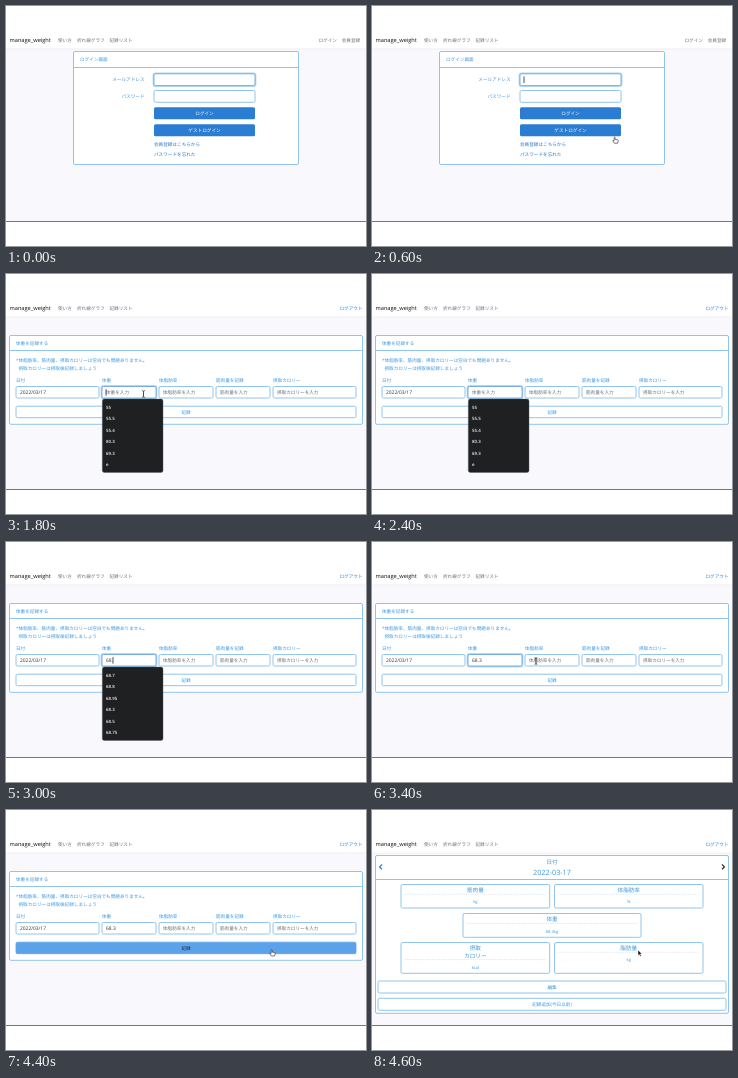
Write an HTML page that moves like this. It is 360 by 240 pixels and loops after 4800 ms.

```html
<!DOCTYPE html>
<html lang="ja">
<head>
<meta charset="utf-8">
<style>
html, body { margin: 0; width: 100%; height: 100%; overflow: hidden; background: #fff; }
svg { display: block; width: 100vw; height: 100vh; font-family: "Open Sans", "Noto Sans CJK JP", sans-serif; text-rendering: geometricPrecision; }
</style>
</head>
<body>
<svg id="stage" viewBox="0 0 360 240"></svg>
<script>
const LOOP = 4800, STEP = 200;
const BLUE = '#3c97dc', EDGE = '#74b8e9', BUTTON = '#2b7dd4', GRAY = '#6c6f73', INK = '#333';
const stage = document.getElementById('stage');

// y is the vertical centre of the text
function text(x, y, str, { fill = BLUE, size = 4.62, anchor = 'start', weight = 400 } = {}) {
  return `<text x="${x}" y="${y + size * 0.37}" fill="${fill}" font-size="${size}" text-anchor="${anchor}" font-weight="${weight}">${str}</text>`;
}
const centred = (x, y, str, style) => text(x, y, str, { anchor: 'middle', ...style });

function box(x1, y1, x2, y2, { fill = '#fff', stroke = EDGE, width = 0.8, r = 1.5 } = {}) {
  return `<rect x="${x1}" y="${y1}" width="${x2 - x1}" height="${y2 - y1}" rx="${r}" fill="${fill}" stroke="${stroke}" stroke-width="${width}"/>`;
}
const line = (x1, y1, x2, y2, stroke = EDGE, extra = '') =>
  `<path d="M${x1} ${y1}L${x2} ${y2}" stroke="${stroke}" stroke-width=".8" fill="none" ${extra}/>`;
const ring = (x1, y1, x2, y2) =>
  box(x1 - 0.6, y1 - 0.6, x2 + 0.6, y2 + 0.6, { fill: 'none', stroke: '#b3d7f5', width: 1.6, r: 2 });
const field = (x1, y1, x2, y2, focused) =>
  (focused ? ring(x1, y1, x2, y2) : '') + box(x1, y1, x2, y2, focused ? { stroke: '#5b9fd6' } : {});
const caret = (x, y) => line(x, y - 3.3, x, y + 3.3, '#222');

function cursor(kind, x, y) {
  const shapes = {
    arrow: '<path d="M0 0V5.6L1.3 4.4 2.3 6.6 3.3 6.1 2.3 4H4Z" fill="#111" stroke="#fff" stroke-width=".5"/>',
    beam: '<path d="M-1.3-3.3Q0-3.3 0-2.5Q0-3.3 1.3-3.3M0-2.5V2.5M-1.3 3.3Q0 3.3 0 2.5Q0 3.3 1.3 3.3" fill="none" stroke="#222" stroke-width=".8"/>',
    hand: '<path d="M-.9.4Q-.4-.5.1.4V2.3L2.8 2.8Q3.4 3 3.2 4L2.6 6.2H-.6L-2.2 3.8Q-2 3-1.2 3.5L-.9 3.8Z" fill="#fff" stroke="#222" stroke-width=".6"/>'
  };
  return `<g transform="translate(${x} ${y})">${shapes[kind]}</g>`;
}

function shell(loggedIn) {
  const link = { fill: GRAY };
  return '<rect width="360" height="240" fill="#fff"/><rect y="43" width="360" height="172" fill="#f8f8fd"/>' +
    line(0, 43, 360, 43, '#ebebf1') + line(0, 215.5, 360, 215.5, '#555') +
    text(3.5, 34, 'manage_weight', { fill: '#111', size: 5.65 }) +
    text(52, 34, '使い方', link) + text(71, 34, '折れ線グラフ', link) + text(103.5, 34, '記録リスト', link) +
    (loggedIn ? text(333.5, 34, 'ログアウト', { fill: '#2587de' })
              : text(312.5, 34, 'ログイン', link) + text(335.7, 34, '会員登録', link));
}

function loginPage(t) {
  const pressed = t >= 800;
  const white = { fill: '#fff' };
  const button = (y, label, active) =>
    (active ? ring(148, y, 249, y + 12) : '') +
    box(148, y, 249, y + 12, { fill: active ? '#2268b3' : BUTTON, stroke: 'none' }) + centred(198.5, y + 6, label, white);
  const dark = { fill: '#2878c4' };
  return shell(false) + box(67.5, 45.5, 292.5, 158.5) + line(67.5, 61.5, 292.5, 61.5) +
    text(74, 53.3, 'ログイン画面') +
    text(138.5, 73.3, 'メールアドレス', { anchor: 'end' }) + text(138.5, 90.2, 'パスワード', { anchor: 'end' }) +
    field(148, 67.8, 249, 79.6, !pressed) + field(148, 84.5, 249, 96.3) +
    (t === 200 || t === 600 ? caret(152, 73.7) : '') +
    button(101.3, 'ログイン') + button(118.2, 'ゲストログイン', pressed) +
    text(148, 138.5, '会員登録はこちらから', dark) + text(148, 148.3, 'パスワードを忘れた', dark);
}

const RECENT = ['55', '55.5', '55.4', '80.3', '69.3', 'e'];
const WEIGHTS = ['69.3', '68.7', '68.8', '68.95', '68.3', '68.5', '68.75'];
const FAT_RATES = ['16.0', '16,0', '16.7', '17.7', '18.0', '16'];

function dropdown(x, items) {
  return box(x, 125, x + 60.7, 198.5, { fill: '#1e2022', stroke: '#55585c', width: 0.4, r: 2 }) +
    items.map((item, i) => text(x + 3.8, 133 + i * 11.5, item, { fill: '#f2f2f2', size: 4.4, weight: 600 })).join('');
}

function recordPage(t) {
  const columns = [
    [10, 93, '日付', '2022/03/17'], [96, 150, '体重', '体重を入力'], [153, 207, '体脂肪率', '体脂肪率を入力'],
    [210, 264, '筋肉量を記録', '筋肉量を入力'], [267, 350, '摂取カロリー', '摂取カロリーを入力']
  ];
  const typed = t >= 3200 ? '68.3' : t >= 3000 ? '68.' : t >= 2800 ? '68' : t >= 2600 ? '6' : '';
  const focus = t >= 4200 ? -1 : t >= 3600 ? 2 : t >= 1800 ? 1 : -1;
  const hover = t >= 4400;
  const inputs = columns.map(([x1, x2, label, hint], i) => {
    const value = i === 0 ? hint : i === 1 ? typed : '';
    return text(x1, 106, label) + field(x1, 112.5, x2, 124, focus === i) +
      text(x1 + 4, 118.4, value || hint, { fill: value ? INK : GRAY, size: value ? 4.9 : 4.62 });
  }).join('');
  const carets = { 1: [1800, 2200, 2600, 2800, 3000, 3200], 2: [3600, 4000] };
  const blink = carets[focus]?.includes(t);
  const caretX = focus === 1 ? 100 + [0, 3, 5.8, 7, 9.8][typed.length] : 157;
  let menu = '';
  if (t >= 1800 && t < 2600) menu = dropdown(96.3, RECENT);
  else if (t >= 2600 && t < 3200) menu = dropdown(96.3, WEIGHTS.slice(t < 2800 ? 0 : 1).slice(0, 6));
  else if (focus === 2) menu = dropdown(153.2, FAT_RATES);
  return shell(true) + box(3.5, 61.5, 356.5, 150.3) + line(3.5, 76.5, 356.5, 76.5) +
    text(10, 69, '体重を記録する') +
    text(10, 86.3, '*体脂肪率、筋肉量、摂取カロリーは空白でも問題ありません。') +
    text(12.5, 94, '摂取カロリーは摂取後記録しましょう') + inputs +
    box(10, 132.2, 350, 143.7, hover ? { fill: '#5ba2ea', stroke: '#5ba2ea' } : {}) +
    centred(180, 138, '記録', hover ? { fill: '#1d2a38' } : {}) +
    (blink ? caret(caretX, 118.4) : '') + menu;
}

function summaryPage() {
  const title = { size: 5.6 }, unit = { size: 4.1 };
  const card = (x1, y1, x2, y2, titles, value, ruleY) => {
    const mid = (x1 + x2) / 2;
    return box(x1, y1, x2, y2) +
      titles.map((str, i) => centred(mid, y1 + 5.8 + i * 7.2, str, title)).join('') +
      line(x1 + 4, ruleY, x2 - 4, ruleY, '#cbdde9', 'stroke-dasharray=".8 1"') +
      centred(mid, ruleY + 7.6, value, unit);
  };
  const chevron = (x, dir, color) =>
    `<path d="M${x - dir} 54.5l${2.4 * dir} 2.4l${-2.4 * dir} 2.4" fill="none" stroke="${color}" stroke-width="1.3"/>`;
  return shell(true) + box(3.5, 45.5, 356.5, 203.3) + line(3.5, 69.5, 356.5, 69.5) +
    centred(180, 52, '日付', title) + centred(180, 62, '2022-03-17', { size: 7.25 }) +
    chevron(9, -1, '#2587de') + chevron(351, 1, '#333') +
    card(29, 74.5, 177.7, 98, ['筋肉量'], 'kg', 84.3) +
    card(182.5, 74.5, 331, 98, ['体脂肪率'], '%', 84.3) +
    card(91, 103.5, 269, 127.3, ['体重'], '68.3kg', 113.5) +
    card(29, 132.5, 177.7, 163.3, ['摂取', 'カロリー'], 'kcal', 149.5) +
    card(182.5, 132.5, 331, 163.3, ['脂肪量'], 'kg', 142.3) +
    box(6, 171, 354, 183) + centred(180, 177, '編集') +
    box(6, 188.3, 354, 200.3) + centred(180, 194.3, '記録追加(今日以前)');
}

// [start time, pointer kind, x, y]
const POINTER = [
  [0], [200, 'arrow', 245, 162], [400, 'arrow', 245, 141], [600, 'hand', 243, 131], [800, 'hand', 241, 125],
  [1000, 'beam', 240, 121.5], [1400, 'beam', 139, 127.5], [1600, 'beam', 137.5, 120], [2000],
  [3400, 'beam', 164, 119], [3800, 'arrow', 216, 137], [4000, 'arrow', 262, 152.3],
  [4400, 'hand', 266, 139.8], [4600, 'arrow', 266, 140]
];

function render(t) {
  const page = t < 1000 ? loginPage(t) : t < 4600 ? recordPage(t) : summaryPage();
  const [, kind, x, y] = POINTER.findLast(([start]) => start <= t);
  stage.innerHTML = page + (kind ? cursor(kind, x, y) : '');
}

let shown = -1;
const origin = performance.now();
function tick() {
  const t = Math.floor((performance.now() - origin) % LOOP / STEP) * STEP;
  if (t !== shown) render(shown = t);
  requestAnimationFrame(tick);
}
tick();
</script>
</body>
</html>
```
